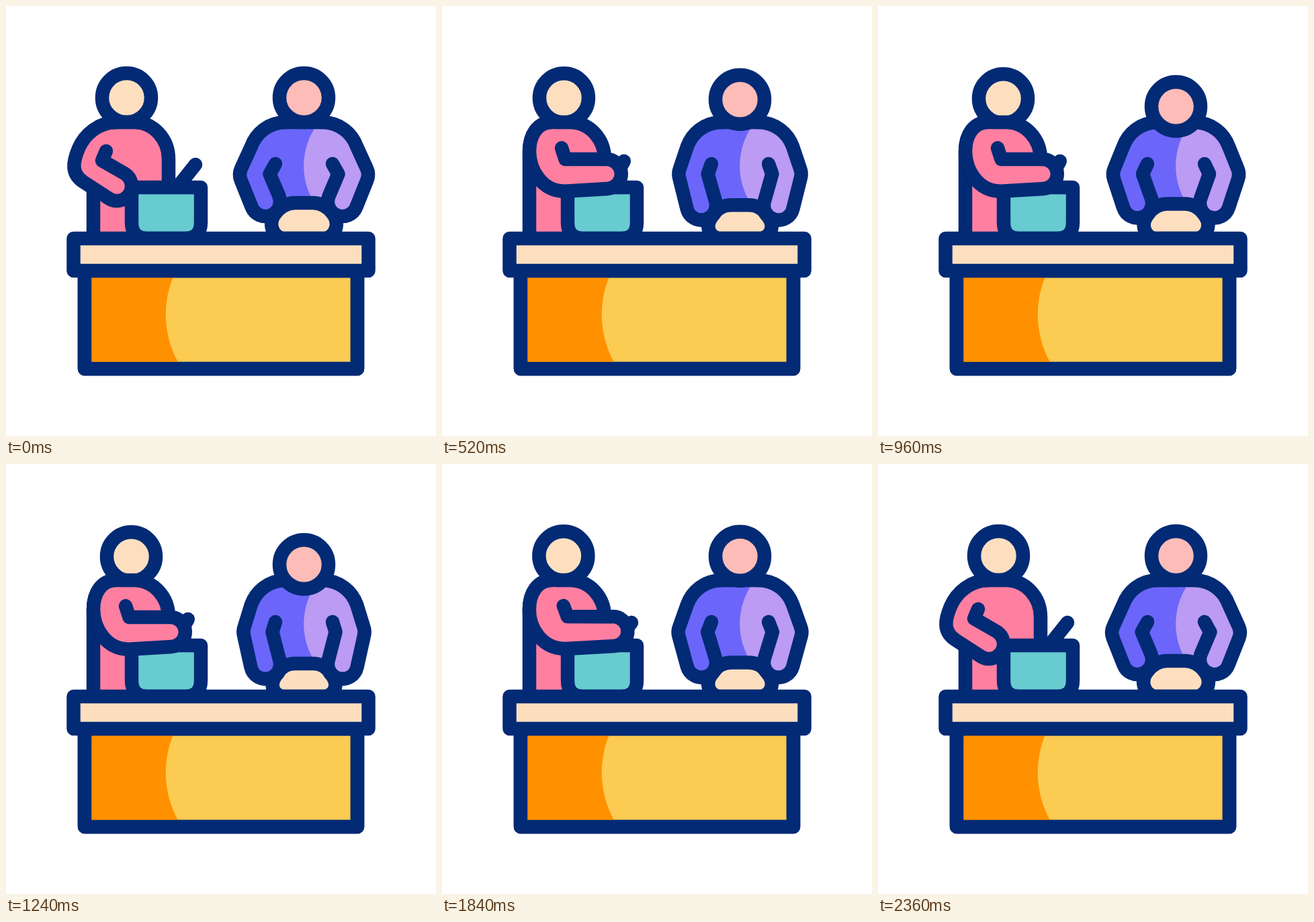
These frames come from a looping animation (640 by 640 pixels, 2.4 s). An HTML page with a canvas:

```html
<!DOCTYPE html>
<html lang="en">
<head>
<meta charset="utf-8">
<title>Kitchen counter</title>
<style>
  html, body { margin: 0; height: 100%; overflow: hidden; background: #fff; }
  canvas { display: block; width: 100vw; height: 100vh; }
</style>
</head>
<body>
<canvas id="stage" width="640" height="640"></canvas>
<script>
const ctx = document.getElementById('stage').getContext('2d');
const LOOP = 2400, STIR_START = 380, STIR_END = 1820, STIR_PERIOD = 720, KNEAD_PERIOD = 800;
const NAVY = '#032a75', PINK = '#ff7fa0', PEACH = '#fddfbf', ROSE = '#fdbcb7', TEAL = '#68cbd0',
      PURPLE = '#6b66f9', LILAC = '#bb9bf3', ORANGE = '#ff9100', YELLOW = '#fccb52';
const RAD = Math.PI / 180, HAND = 22, AXIS = 443.5;

const mix = (a, b, u) => a + (b - a) * u;
const mixAll = (a, b, u) => a.map((v, i) => mix(v, b[i], u));
const ease = u => { u = Math.min(1, Math.max(0, u)); return u * u * (3 - 2 * u); };
const bump = (t, a, b, c, d) => ease((t - a) / (b - a)) - ease((t - c) / (d - c));

// Sleeve outline: shoulder controls, upper arm, elbow controls, elbow end, hand, hand angle, inner corner, inner tip
const REST = [138, 173, 117, 191, 108, 212, 99, 233, 97, 250, 115.5, 262, 165, 268, 33, 143, 230, 149, 216];
const NEAR = [142, 173, 130, 192, 130, 217, 132, 245, 148, 276, 178, 277, 224, 252, -3, 176, 230, 172, 212];
const FAR = [142, 173, 130, 192, 130, 217, 130, 245, 150, 276, 185, 275, 255, 249, -4, 187, 227, 181, 211];

function paint(fill, path) {
  if (fill) { ctx.fillStyle = fill; path ? ctx.fill(path) : ctx.fill(); }
  path ? ctx.stroke(path) : ctx.stroke();
}
const shape = (fill, d) => paint(fill, new Path2D(d));

function head(x, y, fill) {
  ctx.beginPath();
  ctx.arc(x, y, 36.5, 0, 2 * Math.PI);
  paint(fill);
}

function stirringArm(pose) {
  const [c1x, c1y, c2x, c2y, ax, ay, c3x, c3y, c4x, c4y, bx, by, hx, hy, angle, kx, ky, tx, ty] = pose;
  ctx.beginPath();
  ctx.moveTo(164, 173);
  ctx.bezierCurveTo(c1x, c1y, c2x, c2y, ax, ay);
  ctx.bezierCurveTo(c3x, c3y, c4x, c4y, bx, by);
  ctx.arc(hx, hy, HAND, (angle + 90) * RAD, (angle - 90) * RAD, true);
  ctx.lineTo(kx, ky);
  ctx.lineTo(tx, ty);
  paint(PINK);
}

function leftCook(t) {
  const lean = bump(t, 310, 910, 1340, 2040);
  const reach = bump(t, 0, 390, STIR_END, 2240);
  const stirring = t > STIR_START && t < STIR_END;
  const swing = stirring ? Math.cos((t - STIR_START) / STIR_PERIOD * 2 * Math.PI) : 1;

  head(179.5 + 7 * lean, 136.5 + 1.3 * lean, PEACH);
  shape(PINK, 'M130 346V217C130 192 142 173 164 173H190C220 173 242 198 242 228V346');
  shape(null, `M${265 + 17 * swing} ${229 + 5 * swing + 2 * swing * swing}L235 295`);
  shape(TEAL, 'M187 270H290V322Q290 346 266 346H211Q187 346 187 322Z');
  stirringArm(mixAll(REST, mixAll(NEAR, FAR, (swing + 1) / 2), reach));
}

function kneadingArm(side, knead, fill) {
  const ex = mix(-73.5, -68, knead), ey = mix(251, 250, knead);
  const hx = -57.5, hy = mix(291, 298, knead);
  const forearm = Math.atan2(hy - ey, hx - ex);
  ctx.save();
  ctx.translate(AXIS, 0);
  ctx.scale(side, 1);
  ctx.beginPath();
  ctx.moveTo(-26.5, 173);
  ctx.bezierCurveTo(-53.5, 173, -71.5, 190, -78.5, 209);
  ctx.arc(ex, ey, HAND, mix(205, 199, knead) * RAD, forearm + Math.PI / 2, true);
  ctx.arc(hx, hy, HAND, forearm + Math.PI / 2, forearm - Math.PI / 2, true);
  ctx.lineTo(mix(-51, -47, knead), 250);
  ctx.lineTo(-42.5, 235);
  paint(fill);
  ctx.restore();
}

function dough(knead) {
  const top = 293 + 4 * knead, bulge = 54 - 2 * knead, side = 42 - 3 * knead;
  const low = 322 + 4 * knead, mid = 308 + 4 * knead, high = 298 + 4 * knead;
  ctx.save();
  ctx.translate(AXIS, 0);
  shape(PEACH, `M-32 346C-48 342 ${-bulge} ${low} ${-side} ${mid}C-34 ${high} -24 ${top} -13 ${top}
    H13C24 ${top} 34 ${high} ${side} ${mid}C${bulge} ${low} 48 342 32 346Z`);
  ctx.restore();
}

function rightCook(t) {
  const knead = (1 - Math.cos(t / KNEAD_PERIOD * 2 * Math.PI)) / 2;
  const nod = bump(t, 340, 940, 1320, 1930);

  ctx.fillStyle = PURPLE;
  ctx.fillRect(396, 178, 95, 117);
  ctx.fillStyle = LILAC;
  ctx.fill(new Path2D('M491 178H462A105 105 0 0 0 460 295H491Z'));
  shape(null, 'M417 173H470');
  dough(knead);
  kneadingArm(1, knead, PURPLE);
  kneadingArm(-1, knead, LILAC);
  head(AXIS, 136.5 + 13 * nod, ROSE);
}

function counter() {
  const front = 'M117 394H523V540H117Z';
  shape(YELLOW, front);
  ctx.fillStyle = ORANGE;
  ctx.fill(new Path2D('M117 394H253A147 147 0 0 0 262 540H117Z'));
  shape(null, front);
  shape(PEACH, 'M100.5 346H539.5V394H100.5Z');
}

function draw(now) {
  const t = now % LOOP;
  ctx.fillStyle = '#fff';
  ctx.fillRect(0, 0, 640, 640);
  ctx.strokeStyle = NAVY;
  ctx.lineWidth = 20.5;
  ctx.lineCap = ctx.lineJoin = 'round';
  leftCook(t);
  rightCook(t);
  counter();
}

let start;
function tick(now) {
  start ??= now;
  draw(now - start);
  requestAnimationFrame(tick);
}
draw(0);
requestAnimationFrame(tick);
</script>
</body>
</html>
```
